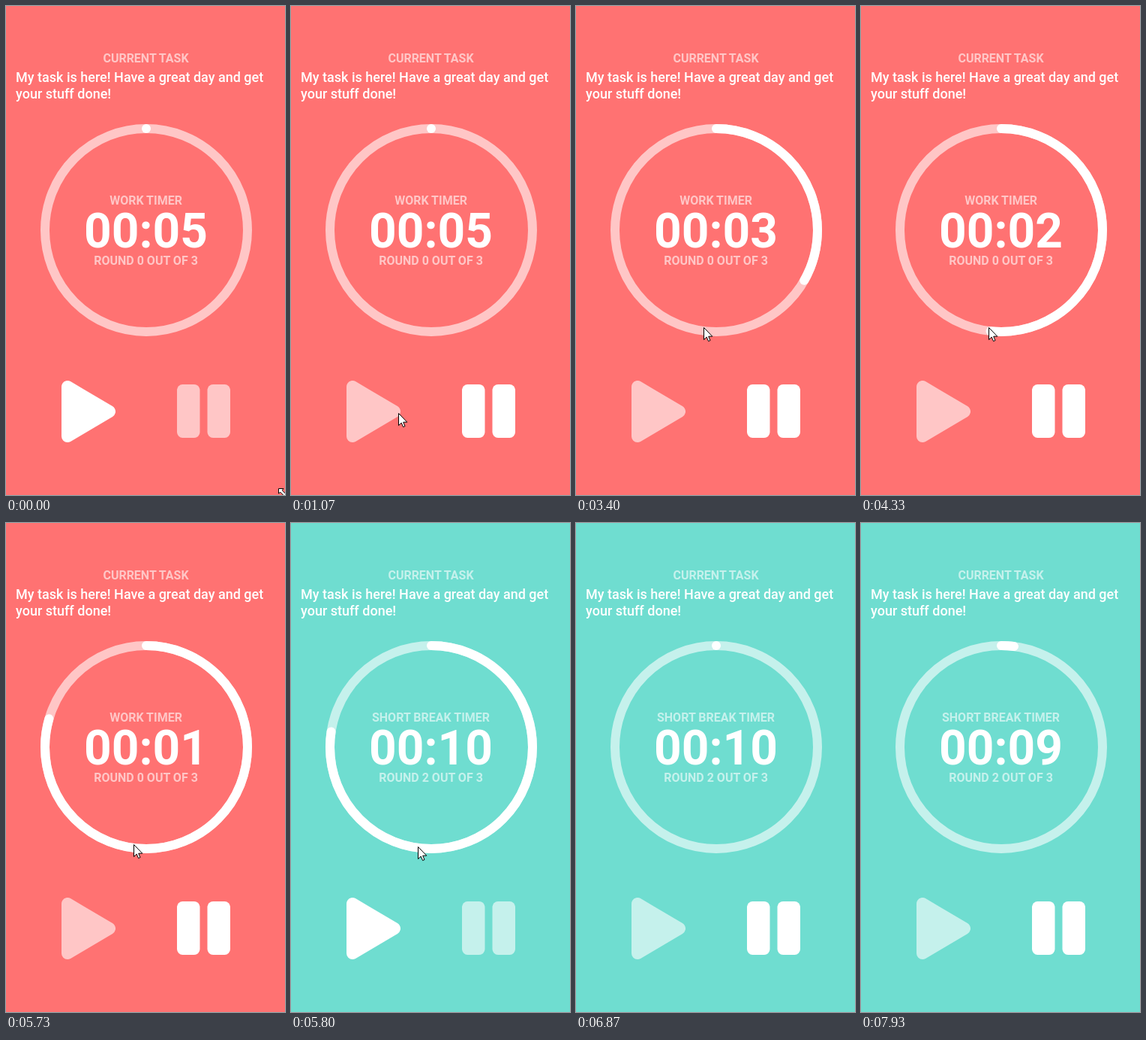
Write an HTML page that moves like this. It is 372 px wide and 650 px high and loops after 8 s.

```html
<!DOCTYPE html>
<html lang="en">
<head>
<meta charset="utf-8">
<title>Work timer</title>
<style>
  html, body { margin: 0; width: 100%; height: 100%; overflow: hidden; }
  body { background: #ff7272; }
  body.rest { background: #6fddd0; }
  svg { display: block; width: 372px; height: 650px; }
  text { font-family: Roboto, sans-serif; fill: #fff; }
  .label { font-size: 16px; font-weight: 700; text-anchor: middle; }
  .task { font-size: 18px; font-weight: 500; }
  .clock { font-size: 64px; font-weight: 700; text-anchor: middle; }
  .dim { opacity: .6; }
  .ring { fill: none; stroke: #fff; stroke-width: 12; stroke-linecap: round; }
  #cursor { fill: #fff; stroke: #000; stroke-linejoin: round; }
</style>
</head>
<body>
<svg viewBox="0 0 372 650">
  <text class="label dim" x="186.5" y="75">CURRENT TASK</text>
  <text class="task" x="13" y="101">My task is here! Have a great day and get</text>
  <text class="task" x="13" y="123">your stuff done!</text>

  <circle class="ring dim" cx="187" cy="298" r="135"/>
  <circle class="ring" id="progress" cx="187" cy="298" r="135" pathLength="360" transform="rotate(-90 187 298)"/>

  <text class="label dim" id="mode" x="186.5" y="264"></text>
  <text class="clock" id="clock" x="186.5" y="321"></text>
  <text class="label dim" id="round" x="186.5" y="344"></text>

  <path id="play" d="M82 506V572L138 539Z" fill="#fff" stroke="#fff" stroke-width="16" stroke-linejoin="round"/>
  <g id="pause" fill="#fff">
    <rect x="228" y="503" width="30.5" height="71" rx="7.5"/>
    <rect x="268.5" y="503" width="30.5" height="71" rx="7.5"/>
  </g>
  <path id="cursor"/>
</svg>
<script>
const LOOP = 8000, STEP = 1000 / 15;
const START = 728, TICK = 1010, FIRST = 1728;
const SWITCH = FIRST + 4 * TICK, RESTART = 6730, NEXT = 7732, LEAVE = 6860;

const SHAPES = {
  arrow: 'M.5.5V16.6L4.2 13.1 6.6 18.6 9 17.5 6.7 12.2H11.8Z',
  hand: 'M-1.6 14V2.2Q-1.6.6 0 .6T1.6 2.2V7.4Q1.8 5.8 3.1 5.8T4.5 7.4V8.2Q4.7 6.4 5.9 6.4T7.3 8V9' +
        'Q7.5 7.4 8.7 7.4T10.1 9V15Q10.1 18 8 20.5V21.5Q7.6 23.5 5 23.5H2Q-.4 23.5-1 21.5' +
        'L-6.6 14.2Q-8 11.8-6 11.2-4.6 10.8-1.6 14ZM1.6 7.4V12M4.5 8.2V12M7.3 9V12.4',
  resize: 'M-8.5-8.5H-2L-3.8-6.2 6.2 3.8 8.5 2V8.5H2L3.8 6.2-6.2-3.8-8.5-2Z'
};

// time, x, y of the pointer
const PATH = [
  [70, 372, 650], [680, 140, 543], [870, 143, 542], [1000, 143, 542],
  [1130, 143, 540], [1200, 143, 540], [1400, 144, 533], [1670, 144, 533],
  [2470, 162, 430], [2800, 170, 427], [5740, 170, 427], [6340, 117, 538]
];

const $ = id => document.getElementById(id);
const smooth = u => u * u * (3 - 2 * u);

function pointer(t) {
  const i = PATH.findIndex(p => p[0] > t);
  if (i === 0) return PATH[0].slice(1);
  if (i < 0) return PATH[PATH.length - 1].slice(1);
  const [a, b] = [PATH[i - 1], PATH[i]];
  const u = smooth((t - a[0]) / (b[0] - a[0]));
  return [1, 2].map(k => Math.round(a[k] + (b[k] - a[k]) * u));
}

// Each tick moves the ring on by one share during the following second.
function angle(t) {
  if (t < FIRST) return 0;
  if (t < SWITCH) {
    const n = Math.floor((t - FIRST) / TICK);
    return 72 * (n + Math.min(1, (t - FIRST - n * TICK) / 1000));
  }
  if (t < NEXT) return 288 * Math.max(0, 1 - (t - SWITCH) / 1000);
  return 36 * (t - NEXT) / 1000;
}

function seconds(t) {
  if (t < FIRST) return 5;
  if (t < SWITCH) return 4 - Math.floor((t - FIRST) / TICK);
  return t < NEXT ? 10 : 9;
}

function draw(t) {
  const rest = t >= SWITCH;
  const running = t >= START && !rest || t >= RESTART;
  document.body.classList.toggle('rest', rest);
  $('mode').textContent = rest ? 'SHORT BREAK TIMER' : 'WORK TIMER';
  $('round').textContent = `ROUND ${rest ? 2 : 0} OUT OF 3`;
  $('clock').textContent = '00:' + String(seconds(t)).padStart(2, '0');
  $('progress').setAttribute('stroke-dasharray', Math.max(.01, angle(t)) + ' 999');
  $('play').classList.toggle('dim', running);
  $('pause').classList.toggle('dim', !running);

  const [x, y] = pointer(t);
  const overPlay = x > 74 && Math.abs(y - 539) < (146 - x) * .6 + 3;
  const shape = t < 130 ? 'resize' : overPlay && !running ? 'hand' : 'arrow';
  const cursor = $('cursor');
  cursor.setAttribute('d', SHAPES[shape]);
  cursor.setAttribute('transform', `translate(${x} ${y})`);
  cursor.style.display = t < LEAVE ? '' : 'none';
}

const begin = performance.now();
function loop() {
  const t = (performance.now() - begin) % LOOP;
  draw(Math.floor((t + 4) / STEP) * STEP % LOOP);
  requestAnimationFrame(loop);
}
loop();
</script>
</body>
</html>
```
